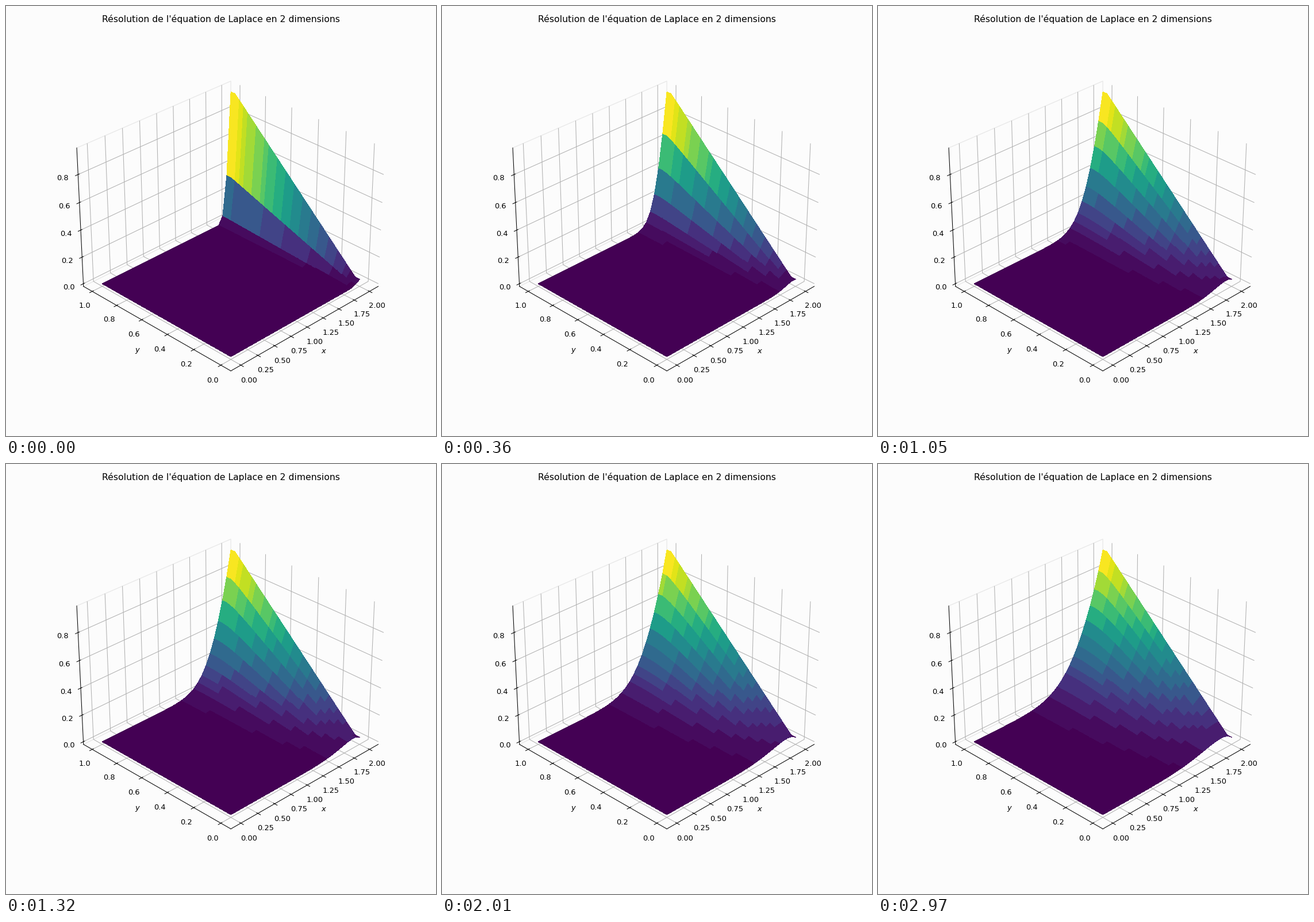
Write a matplotlib script that moves like this. It is 748x748 px and loops after 3000 ms.

```python
import numpy as np
import matplotlib.pyplot as plt
from matplotlib.animation import FuncAnimation
from matplotlib.colors import ListedColormap

N = 31
FRAMES = 100
INTERVAL = 30
PAPER = "#fcfcfc"

x = np.linspace(0, 2, N)
y = np.linspace(0, 1, N)
X, Y = np.meshgrid(x, y)


def relax(p):
    """One Jacobi sweep, with fixed sides in x and zero slope in y."""
    q = p.copy()
    q[1:-1, 1:-1] = (p[1:-1, 2:] + p[1:-1, :-2] + p[2:, 1:-1] + p[:-2, 1:-1]) / 4
    q[:, 0] = 0
    q[:, -1] = y
    q[0] = q[1]
    q[-1] = q[-2]
    return q


def solve():
    p = np.zeros((N, N))
    p[:, -1] = y
    p = relax(p)
    states = []
    for _ in range(FRAMES):
        p = relax(p)
        states.append(p)
    return states


def stepped_viridis():
    levels = np.array([0, .03, .08, .14, .2, .27, .34, .41, .48, .55,
                       .62, .68, .74, .8, .86, .91, .955, .99])
    t = np.linspace(0, 1, 256)
    nearest = np.abs(t[:, None] - levels).argmin(axis=1)
    return ListedColormap(plt.get_cmap("viridis")(levels[nearest]))


def padded(lo, hi, margin=0.0):
    m = (hi - lo) * margin
    lo, hi = lo - m, hi + m
    d = (hi - lo) / 48
    return lo - d, hi + d


states = solve()
cmap = stepped_viridis()

fig = plt.figure(figsize=(8, 8), dpi=93.5, facecolor=PAPER)
fig.suptitle("Résolution de l'équation de Laplace en 2 dimensions")
ax = fig.add_subplot(projection="3d", facecolor=PAPER)
ax.view_init(30, 225)
ax.set_xticks(np.arange(0, 2.01, 0.25))
ax.set_yticks(np.arange(0, 1.01, 0.2))
ax.set_zticks(np.arange(0, 0.81, 0.2))
ax.set_xlim(*padded(0, 2, 0.05))
ax.set_ylim(*padded(0, 1, 0.05))
ax.set_zlim(*padded(0, y[-2]))
ax.set_xlabel("$x$")
ax.set_ylabel("$y$")

# Only the left wall keeps a faint outline.
for axis in (ax.xaxis, ax.zaxis):
    axis.set_pane_color((1, 1, 1, 0))
ax.yaxis.set_pane_color(PAPER, 1)
ax.yaxis.pane.set_edgecolor("#e8e8e8")

surface = None


def update(i):
    global surface
    if surface is not None:
        surface.remove()
    surface = ax.plot_surface(X, Y, states[i], rstride=1, cstride=1, cmap=cmap,
                              linewidth=0, antialiased=False)
    return surface,


anim = FuncAnimation(fig, update, frames=FRAMES, interval=INTERVAL,
                     init_func=lambda: update(0), repeat=True, repeat_delay=0)
plt.show()
```
